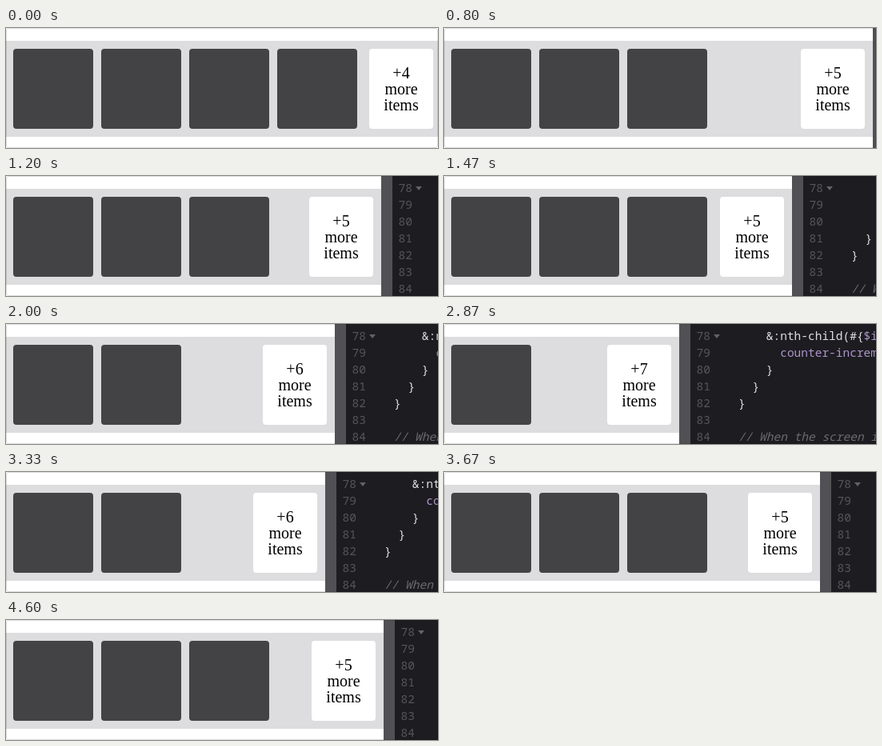
An HTML page that plays this animation: 540x150 px, repeating every 4.67 s.

```html
<!DOCTYPE html>
<html lang="en">
<head>
<meta charset="utf-8">
<title>Resizable item list</title>
<style>
  html, body { margin: 0; width: 100%; height: 100%; overflow: hidden; background: #fff; }
  #stage { position: relative; width: 540px; height: 150px; overflow: hidden; }
  #stage::after {
    content: ""; position: absolute; inset: 0; box-sizing: border-box;
    border: 1px solid rgba(0, 0, 0, .14); border-radius: 3px;
  }
  #band { position: absolute; left: 0; top: 16px; width: 100%; height: 120px; background: #dddcde; }
  .tile, #more { position: absolute; top: 10px; height: 100px; border-radius: 4px; }
  .tile { width: 100px; background: #434244; }
  #more {
    left: 0; width: 80px; box-sizing: border-box; padding-top: 20px; background: #fff; color: #000;
    font: 20px/20px "Liberation Serif", Times, serif; text-align: center; white-space: pre-line;
  }
  #editor {
    position: absolute; left: 0; top: 0; width: 300px; height: 150px; box-sizing: border-box;
    border-left: 14px solid #515054; background: #1d1c21;
  }
  pre { position: absolute; top: 4px; margin: 0; font: 14.5px/20.95px "Noto Sans Mono", monospace; }
  #lines { left: 7.5px; color: #56555b; }
  #code { left: 60px; color: #dedee2; }
  #fold {
    position: absolute; left: 29px; top: 13px;
    border: 4.5px solid transparent; border-top: 5px solid #626167; border-bottom: 0;
  }
  i { color: #6c6b71; }
  b { color: #ab96c9; font-weight: 400; }
</style>
</head>
<body>
<div id="stage">
  <div id="band"><div id="more"></div></div>
  <div id="editor">
    <pre id="lines">78
79
80
81
82
83
84</pre>
    <div id="fold"></div>
    <pre id="code">    &amp;:nth-child(#{<b>$i</b>}) {
      <b>counter-increment</b>: items;
    }
  }
}

<i>// When the screen is</i></pre>
  </div>
</div>
<script>
const DURATION = 4670, STEPS = 70, TOTAL = 8;
// Panel width while the divider is dragged: [step, width]
const drag = [[11, 544], [12, 536], [22, 435], [30, 411], [35, 377],
              [43, 294], [50, 421], [51, 443], [56, 472]];

const band = document.getElementById("band");
const more = document.getElementById("more");
const editor = document.getElementById("editor");
const tiles = [0, 1, 2, 3].map(i => {
  const tile = document.createElement("div");
  tile.className = "tile";
  tile.style.left = 9 + 110 * i + "px";
  band.prepend(tile);
  return tile;
});

const slope = i => (drag[i + 1][1] - drag[i][1]) / (drag[i + 1][0] - drag[i][0]);

// Harmonic mean of neighbouring slopes: smooth without overshoot
function tangent(i) {
  if (i === 0 || i === drag.length - 1) return 0;
  const a = slope(i - 1), b = slope(i);
  return a * b > 0 ? 2 * a * b / (a + b) : 0;
}

function widthAt(step) {
  const last = drag.length - 1;
  if (step <= drag[0][0]) return drag[0][1];
  if (step >= drag[last][0]) return drag[last][1];
  const i = drag.findIndex(p => p[0] > step) - 1;
  const [x0, y0] = drag[i], [x1, y1] = drag[i + 1];
  const h = x1 - x0, u = (step - x0) / h, v = 1 - u;
  return v * v * (1 + 2 * u) * y0 + u * u * (3 - 2 * u) * y1
    + h * u * v * (v * tangent(i) - u * tangent(i + 1));
}

function draw() {
  const time = (performance.now() + 4) % DURATION;
  const width = Math.round(widthAt(Math.floor(time / DURATION * STEPS)));
  const visible = Math.floor((width - 100) / 110);
  tiles.forEach((tile, i) => tile.hidden = i >= visible);
  more.style.transform = `translateX(${width - 90}px)`;
  more.textContent = `+${TOTAL - visible}\nmore\nitems`;
  editor.style.transform = `translateX(${width}px)`;
  requestAnimationFrame(draw);
}
draw();
</script>
</body>
</html>
```
